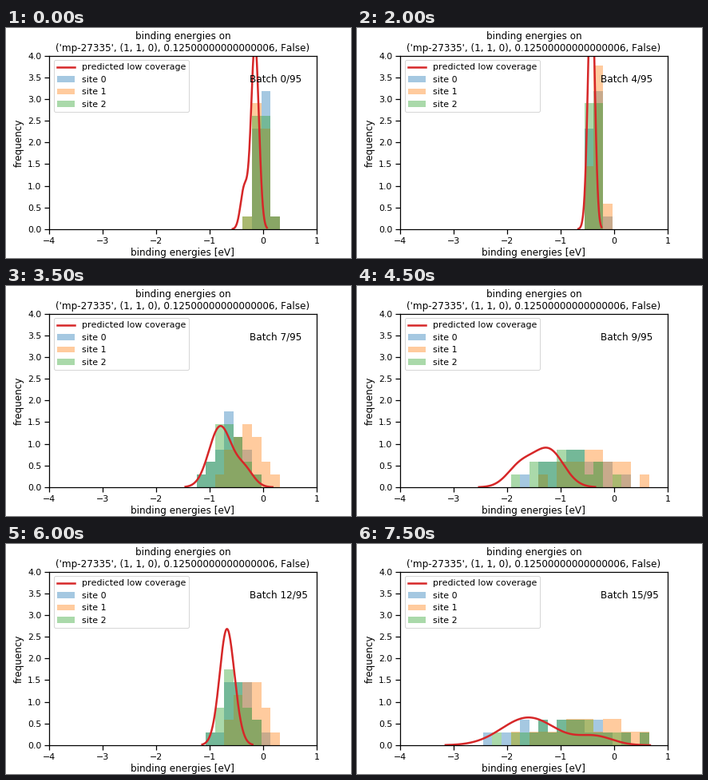
A matplotlib script that plays this animation: 432 px wide and 288 px high, repeating every 8000 ms.

```python
import numpy as np
import matplotlib.pyplot as plt
from matplotlib.animation import FuncAnimation

plt.rcParams.update({
    "font.family": "DejaVu Sans", "font.size": 12, "text.kerning_factor": 6,
    "axes.labelsize": 12, "axes.titlesize": 12, "axes.linewidth": 1.25,
    "xtick.labelsize": 11, "ytick.labelsize": 11, "legend.fontsize": 11,
    "xtick.major.size": 6, "ytick.major.size": 6,
    "xtick.major.width": 1.25, "ytick.major.width": 1.25,
})

LOW, HIGH, N_BINS, N_SAMPLES = -4, 1, 29, 20
EDGES = np.linspace(LOW, HIGH, N_BINS + 1)
N_BATCHES, TOTAL = 16, 95

# Key batches; the ones between are interpolated.
# main peak (height, centre, sd), side peak, mean of each site, their spread
KEYS = {
    0: (4.3, -.15, .072, .95, -.35, .07, -.01, -.04, -.03, .1),
    2: (11, -.325, .033, 1, -.325, .033, -.293, -.31, -.293, .04),
    4: (5, -.42, .06, 1, -.45, .07, -.36, -.32, -.38, .08),
    5: (1.3, -1.02, .23, .48, -.55, .2, -.72, -.67, -.71, .26),
    7: (1.4, -.8, .21, .4, -.35, .17, -.6, -.32, -.65, .26),
    9: (.85, -1.22, .28, .48, -1.75, .25, -.72, -.38, -.9, .47),
    11: (2.33, -.685, .143, .64, -1.12, .09, -.59, -.35, -.72, .23),
    13: (1.8, -.65, .16, .6, -.25, .13, -.29, -.11, -.35, .26),
    15: (.64, -1.6, .5, .2, -.35, .33, -.9, -.42, -.82, .74),
}
TRACKS = np.array(list(KEYS.values())).T

# Evenly ranked standard normal samples
normal = np.random.default_rng(1).normal(size=20000)
RANKED = np.quantile(normal, (np.arange(N_SAMPLES) + .5) / N_SAMPLES)


def state(i):
    """Curve points and the density of each site for batch i."""
    p = [np.interp(i, list(KEYS), track) for track in TRACKS]
    peaks, means, spread = (p[:3], p[3:6]), p[6:9], p[9]
    x = np.linspace(min(m - 3.1 * s for _, m, s in peaks),
                    max(m + 3.1 * s for _, m, s in peaks), 300)
    y = sum(h * np.exp(-((x - m) / s) ** 2 / 2) for h, m, s in peaks)
    sites = [np.histogram(m + spread * RANKED, EDGES, density=True)[0]
             for m in means]
    return x, y, sites


fig = plt.figure(figsize=(6, 4), dpi=72, facecolor="white")
fig.subplots_adjust(left=.125, right=.9, bottom=.125, top=.88)
ax = fig.add_subplot()
ax.set(xlim=(LOW, HIGH), ylim=(0, 4), yticks=np.arange(0, 4.1, .5),
       xlabel="binding energies [eV]", ylabel="frequency",
       title="binding energies on\n"
             "('mp-27335', (1, 1, 0), 0.12500000000000006, False)")

curve, = ax.plot([], [], color="C3", lw=2.5, label="predicted low coverage")
hists = [ax.bar(EDGES[:-1], np.zeros(N_BINS), np.diff(EDGES), align="edge",
                color=f"C{k}", alpha=.4, lw=0, label=f"site {k}")
         for k in range(3)]
ax.legend(handles=[curve, *hists], loc="upper left")
note = ax.text(.75, .85, "", transform=ax.transAxes)


def update(i):
    x, y, sites = state(i)
    curve.set_data(x, y)
    for bars, heights in zip(hists, sites):
        for bar, h in zip(bars, heights):
            bar.set_height(h)
    note.set_text(f"Batch {i}/{TOTAL}")
    return [curve, note]


anim = FuncAnimation(fig, update, frames=N_BATCHES, interval=500,
                     repeat=True, repeat_delay=0)
plt.show()
```
